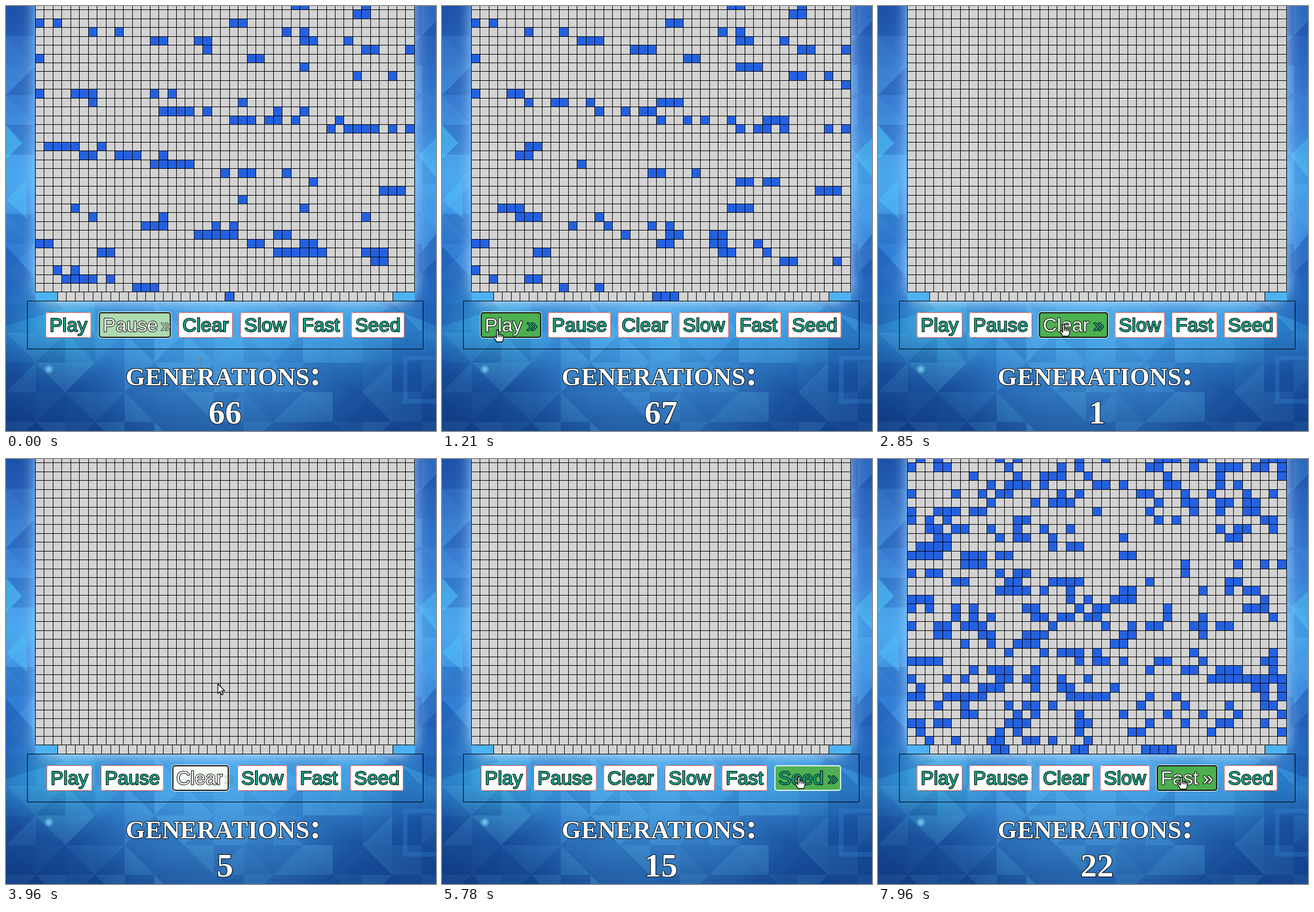
Animation, 753 px wide and 744 px high, one loop 8 s. Source, as an HTML page with a canvas:

```html
<!DOCTYPE html>
<html lang="en">
<head>
<meta charset="utf-8">
<title>Game of Life</title>
<style>
  html, body { margin: 0; width: 100%; height: 100%; overflow: hidden; background: #2a6cc0; }
  canvas { display: block; }
</style>
</head>
<body>
<canvas id="stage" width="753" height="744"></canvas>
<script>
const W = 753, H = 744, LOOP = 8000;
const ctx = document.getElementById('stage').getContext('2d');

const clamp = v => Math.max(0, Math.min(1, v));
const mix = (a, b, t) => a + (b - a) * t;
const smooth = t => t * t * (3 - 2 * t);
const blend = (a, b, t) => `rgb(${a.map((v, i) => Math.round(mix(v, b[i], t)))})`;

function seeded(seed) {
  return () => {
    seed = (seed + 0x6D2B79F5) | 0;
    let r = Math.imul(seed ^ (seed >>> 15), 1 | seed);
    r = (r + Math.imul(r ^ (r >>> 7), 61 | r)) ^ r;
    return ((r ^ (r >>> 14)) >>> 0) / 4294967296;
  };
}

// CSS "ease" curve: cubic-bezier(.25, .1, .25, 1)
function ease(x) {
  x = clamp(x);
  let lo = 0, hi = 1, s = x;
  for (let i = 0; i < 16; i++) {
    s = (lo + hi) / 2;
    const px = 0.75 * s * (1 - s) * (1 - s) + 0.75 * s * s * (1 - s) + s * s * s;
    if (px < x) lo = s; else hi = s;
  }
  return 0.3 * s * (1 - s) * (1 - s) + 3 * s * s * (1 - s) + s * s * s;
}

// ---- Life: a 50 x 30 board whose cells are shown wrapped, 43 to a line ----
const COLS = 50, ROWS = 30, SIZE = COLS * ROWS, PER_LINE = 43;

function evolve(board) {
  return board.map((alive, i) => {
    const x = i % COLS, y = Math.floor(i / COLS);
    let n = 0;
    for (let dy = -1; dy <= 1; dy++) for (let dx = -1; dx <= 1; dx++) {
      const nx = x + dx, ny = y + dy;
      if ((dx || dy) && nx >= 0 && nx < COLS && ny >= 0 && ny < ROWS) n += board[ny * COLS + nx];
    }
    return n === 3 || (alive && n === 2) ? 1 : 0;
  });
}

// Starting colony: where each run of live cells begins, keyed by run length
const colony = {
  1: [80, 129, 131, 178, 181, 200, 202, 250, 277, 374, 423, 427, 473, 486, 488, 522, 539,
      578, 586, 589, 631, 636, 678, 685, 687, 738, 788, 881, 888, 934, 1012, 1036, 1062,
      1081, 1089, 1112, 1138, 1140, 1335, 1337, 1384, 1481],
  2: [72, 122, 151, 228, 233, 245, 295, 300, 325, 628, 779, 883, 1188, 1204, 1228, 1234, 1254, 1328],
  3: [477, 624, 783, 985, 1130, 1284, 1430],
  4: [573, 680, 732, 1379],
  5: [830, 1179],
  6: [1274]
};

const empty = new Array(SIZE).fill(0);
const start = empty.slice();
for (const len in colony)
  for (const at of colony[len]) start.fill(1, at, at + Number(len));

const rnd = seeded(19);
const soup = empty.map(() => (rnd() < 0.32 ? 1 : 0));

const timeline = [];
function run(board, count, times) {
  for (const at of times) {
    timeline.push({ at, board, count });
    board = evolve(board);
    count++;
  }
}
run(start, 66, [0, 1200, 1400, 1650, 1900, 2150, 2400, 2640]);
run(empty, 0, [2740, 2800]);
run(empty, 2, Array.from({ length: 14 }, (_, i) => 3170 + 200 * i));
run(soup, 15, [5860, 6000, 6300, 6600, 6880, 7180, 7480, 7800]);

const PITCH = 15.44;
const lineX = (c, left) => Math.round(left + PITCH * c);
const lineY = r => Math.round(6.3 + PITCH * r);

function drawBoard(g, board) {
  g.fillStyle = '#000';
  g.fillRect(51, 0, 665, 501);
  g.fillRect(90, 500, 588, 17);
  for (let i = PER_LINE; i < SIZE; i++) {
    const r = Math.floor(i / PER_LINE) - 2, c = i % PER_LINE;
    const left = r === 32 ? 90 : 51;
    const x = lineX(c, left) + 1, y = lineY(r) + 1;
    g.fillStyle = board[i] ? '#2461e1' : '#d3d3d3';
    g.fillRect(x, y, lineX(c + 1, left) - x, lineY(r + 1) - y);
  }
}

// ---- Faceted blue backdrop ----
function makeBackdrop() {
  const cv = document.createElement('canvas');
  cv.width = W; cv.height = H;
  const g = cv.getContext('2d'), rand = seeded(7);
  const poly = (fill, ...p) => {
    g.fillStyle = fill;
    g.beginPath();
    for (let i = 0; i < p.length; i += 2) g.lineTo(p[i], p[i + 1]);
    g.fill();
  };
  const glow = (x, y, r, rgb, a) => {
    const grad = g.createRadialGradient(x, y, 0, x, y, r);
    grad.addColorStop(0, `rgba(${rgb},${a})`);
    grad.addColorStop(1, `rgba(${rgb},0)`);
    g.fillStyle = grad;
    g.fillRect(0, 0, W, H);
  };

  const sky = g.createLinearGradient(0, 0, 0, H);
  [[0, '#2058b2'], [.1, '#2c68c0'], [.25, '#3a80d6'], [.4, '#46a2ec'], [.55, '#3380d6'],
   [.68, '#2c7cd2'], [.76, '#2f88d6'], [.86, '#2263b2'], [1, '#174a94']]
    .forEach(([at, color]) => sky.addColorStop(at, color));
  g.fillStyle = sky;
  g.fillRect(0, 0, W, H);

  const S = 52;
  for (let y = -S; y < H; y += S) for (let x = -S; x < W; x += S) {
    const shade = () => (rand() < .5 ? '120,215,255,' : '10,50,130,') + (rand() * .2).toFixed(2);
    const up = (x + y) / S % 2 === 0, x2 = x + S, y2 = y + S;
    poly(`rgba(${shade()})`, x, y, x2, y, up ? x : x2, y2);
    poly(`rgba(${shade()})`, x, y2, x2, y2, up ? x2 : x, y);
  }
  poly('rgba(80,200,250,.55)', 0, 208, 28, 240, 0, 268);
  poly('rgba(80,195,250,.45)', 0, 340, 34, 305, 37, 372);
  poly('rgba(80,200,250,.5)', 753, 232, 722, 262, 753, 300);
  poly('rgba(25,75,165,.45)', 0, 420, 100, 530, 0, 560);
  poly('rgba(25,75,165,.45)', 753, 400, 650, 520, 753, 560);
  glow(380, 535, 300, '100,200,255', .6);
  glow(95, 560, 110, '80,215,240', .5);
  glow(640, 550, 120, '70,190,240', .35);
  glow(0, 744, 230, '12,48,118', .55);
  glow(753, 730, 240, '14,56,130', .5);
  glow(75, 636, 9, '130,225,255', .9);

  g.strokeStyle = 'rgba(60,140,220,.28)';
  g.lineWidth = 8;
  g.strokeRect(699, 616, 70, 76);

  // Soft light spilling from behind the board
  g.shadowColor = 'rgba(165,205,255,.95)';
  g.shadowBlur = 24;
  g.fillStyle = '#4cb2f2';
  g.fillRect(50, -60, 667, 561);
  g.shadowColor = 'rgba(225,240,255,.95)';
  g.fillRect(66, 440, 635, 76);
  g.shadowBlur = 0;
  g.fillRect(52, 501, 664, 15);
  return cv;
}

// ---- Buttons ----
const FONT = '34px "Liberation Sans", Arial, sans-serif';
const TEAL = [24, 166, 136], WHITE = [255, 255, 255], GREEN = [76, 175, 80];
const BAR_LEFT = 56, BAR_WIDTH = 655, TOP = 536, TALL = 45, GROW = 26;

// hover and focus are [from, to] spans in ms
const buttons = [
  { label: 'Play', hover: [[620, 1520]], focus: [1130, 2740] },
  { label: 'Pause', hover: [[-2000, -120], [1640, 2000]], focus: [-2000, 1130] },
  { label: 'Clear', hover: [[2080, 3680]], focus: [2740, 4250] },
  { label: 'Slow', hover: [[4710, 5130]], focus: null },
  { label: 'Fast', hover: [[5170, 5350], [6870, 9999]], focus: [7300, 9999] },
  { label: 'Seed', hover: [[5465, 6860]], focus: [5810, 7300], press: 5740 }
];
ctx.font = FONT;
for (const b of buttons) b.base = ctx.measureText(b.label).width + 14;

function hoverAmount(b, t, duration) {
  let amount = 0;
  for (const [on, off] of b.hover) {
    if (t < on) continue;
    const peak = ease((Math.min(t, off) - on) / duration);
    amount = Math.max(amount, t < off ? peak : peak * (1 - ease((t - off) / duration)));
  }
  return amount;
}

const inSpan = (span, t) => span && t >= span[0] && t < span[1];

function roundBox(x, y, w, h, r) {
  ctx.beginPath();
  ctx.roundRect(x, y, w, h, r);
}

function outlined(text, x, y, fill, width = 2) {
  ctx.lineWidth = width;
  ctx.lineJoin = 'round';
  ctx.strokeStyle = '#000';
  ctx.strokeText(text, x, y);
  ctx.fillStyle = fill;
  ctx.fillText(text, x, y);
}

function drawButton(b, x, w, grow, t) {
  const focused = inSpan(b.focus, t);
  const pressed = b.press && t >= b.press && !focused && t < b.focus[0];
  roundBox(x, TOP, w, TALL, 4);
  ctx.fillStyle = blend(WHITE, GREEN, hoverAmount(b, t, 380));
  ctx.fill();
  if (focused) {
    roundBox(x - .5, TOP - .5, w + 1, TALL + 1, 5);
    ctx.lineWidth = 1;
    ctx.strokeStyle = '#fff';
    ctx.stroke();
  }
  const thick = focused || pressed ? 2 : 1, inset = thick / 2;
  roundBox(x + inset, TOP + inset, w - thick, TALL - thick, 4);
  ctx.lineWidth = thick;
  ctx.strokeStyle = focused ? '#101010' : pressed ? '#e8efe8' : '#d2423c';
  ctx.stroke();

  ctx.font = FONT;
  ctx.textAlign = 'left';
  outlined(b.label, x + 7, 570, blend(TEAL, WHITE, focused ? 1 : 0));
  if (grow > .01) {
    const tint = focused ? clamp((t - b.focus[0] - 80) / 420) : 0;
    ctx.save();
    ctx.globalAlpha = grow;
    ctx.textAlign = 'right';
    outlined('»', x + w - 7 + 20 * (1 - grow), 570, blend(TEAL, WHITE, tint));
    ctx.restore();
  }
}

function drawBar(t) {
  ctx.strokeStyle = '#000';
  ctx.lineWidth = 1;
  ctx.strokeRect(37.5, 516.5, 693, 84);
  const grows = buttons.map(b => hoverAmount(b, t, 500));
  const widths = buttons.map((b, i) => b.base + GROW * grows[i]);
  const gap = (BAR_WIDTH - widths.reduce((a, w) => a + w, 0)) / (buttons.length + 1);
  let x = BAR_LEFT + gap;
  buttons.forEach((b, i) => {
    drawButton(b, x, widths[i], grows[i], t);
    x += widths[i] + gap;
  });
}

// ---- Pointer: [ms, x, y] ----
const route = [
  [0, 342, 625], [150, 335, 640], [420, 230, 600], [640, 120, 568], [900, 97, 567], [1400, 97, 567],
  [1800, 215, 562], [2250, 325, 557], [3550, 325, 557], [4000, 372, 390], [4250, 398, 226],
  [4420, 410, 256], [4720, 450, 545], [4890, 455, 560], [5050, 460, 560], [5200, 530, 560],
  [5465, 600, 557], [5700, 625, 556], [6700, 625, 556], [6865, 577, 562], [7010, 511, 567],
  [7500, 531, 557], [8000, 531, 557]
];
const arrow = new Path2D('M0 0V17L4 13.4L6.6 19.4L9.2 18.3L6.7 12.4H12Z');
const hand = new Path2D('M-1.5 1Q0 -1 1.5 1V8Q3.5 6.5 4.5 8.5Q6.5 7.5 7.5 9.5Q10 8.8 10.5 11' +
  'V15Q10 18 8.5 21H-1.5Q-3 17.5 -6 13.5Q-6.5 10.5 -4 11.5L-1.5 14Z');

function drawPointer(t) {
  const i = Math.max(1, route.findIndex(p => p[0] >= t));
  const a = route[i - 1], b = route[i];
  const s = smooth((t - a[0]) / (b[0] - a[0]));
  const x = mix(a[1], b[1], s), y = mix(a[2], b[2], s);
  ctx.save();
  ctx.translate(x, y);
  ctx.lineWidth = 1.3;
  if (y > 600) {
    ctx.strokeStyle = '#8c7a62';
    ctx.stroke(new Path2D('M-4 -8H-1L0 -7L1 -8H4M0 -7V7M-4 8H-1L0 7L1 8H4'));
  } else {
    const onButton = buttons.some(k => k.hover.some(h => inSpan(h, t)));
    const shape = onButton ? hand : arrow;
    ctx.fillStyle = '#fff';
    ctx.strokeStyle = '#000';
    ctx.fill(shape);
    ctx.stroke(shape);
    if (onButton) ctx.stroke(new Path2D('M1.5 8V12M4.5 9V12.5M7.5 10V13'));
  }
  ctx.restore();
}

// ---- Counter ----
const serif = px => `bold ${px}px "Liberation Serif", "Times New Roman", serif`;

function drawCounter(count) {
  ctx.textAlign = 'left';
  ctx.font = serif(44);
  outlined('GENERATIONS', 209.5, 664, '#fff');
  const end = 209.5 + ctx.measureText('GENERATIONS').width;
  ctx.font = serif(62);
  outlined(':', end, 664, '#fff');
  ctx.textAlign = 'center';
  ctx.font = serif(58);
  outlined(String(count), 383.5, 731, '#fff');
}

const backdrop = makeBackdrop();
const boardLayer = document.createElement('canvas');
boardLayer.width = W; boardLayer.height = H;
const boardCtx = boardLayer.getContext('2d');
let shown = null;

function draw(t) {
  const state = timeline.findLast(s => s.at <= t);
  if (state.board !== shown) drawBoard(boardCtx, shown = state.board);
  ctx.drawImage(backdrop, 0, 0);
  ctx.drawImage(boardLayer, 0, 0);
  drawBar(t);
  drawCounter(state.count);
  drawPointer(t);
}

const began = performance.now();
function frame() {
  draw((performance.now() - began) % LOOP);
  requestAnimationFrame(frame);
}
frame();
</script>
</body>
</html>
```
